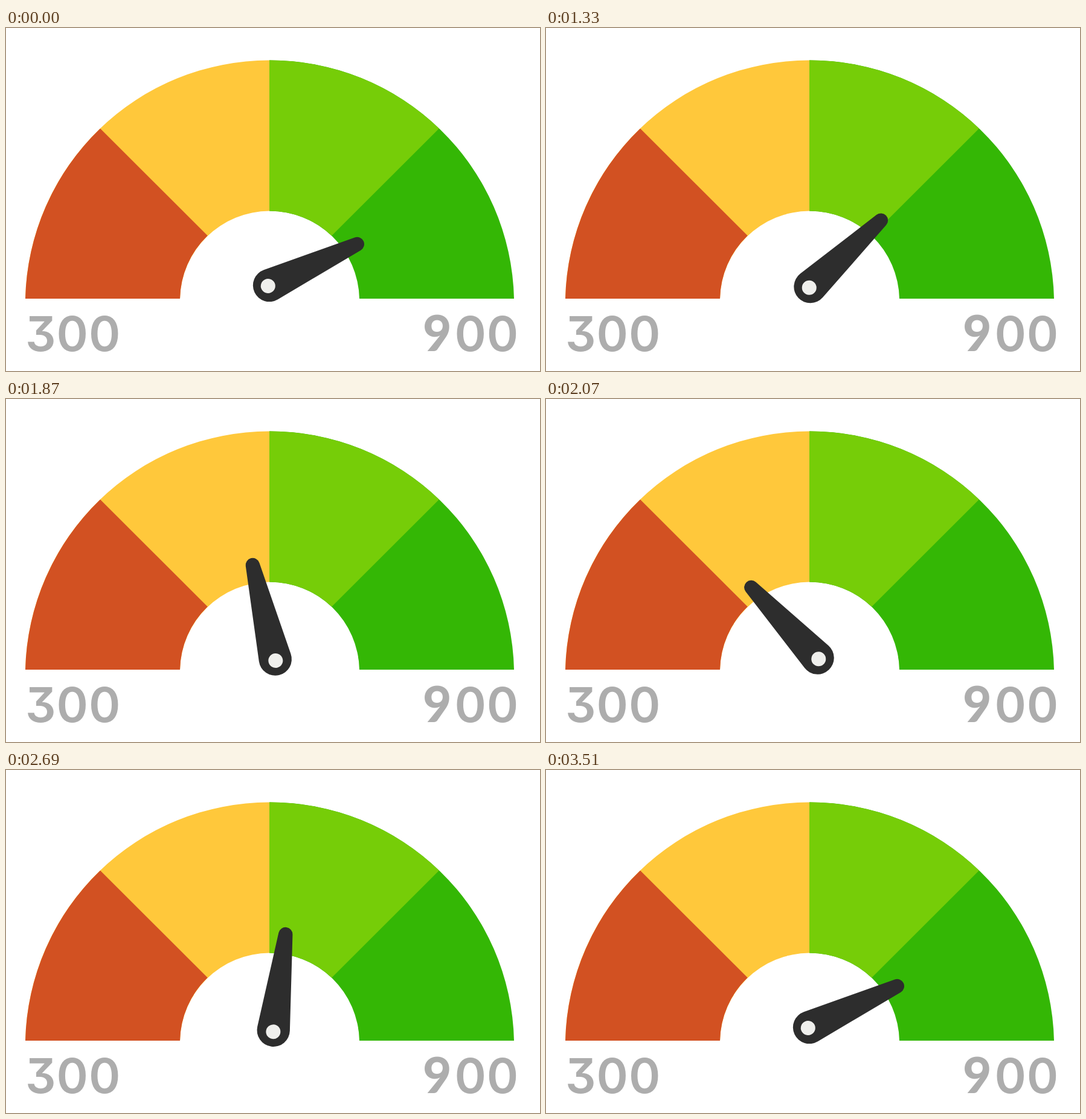
An HTML page that plays this animation: 884 by 569 pixels, repeating every 3.91 s.

```html
<!DOCTYPE html>
<html lang="en">
<head>
<meta charset="utf-8">
<title>Score gauge</title>
<style>
  html, body { margin: 0; width: 100%; height: 100%; overflow: hidden; background: #fff; }
  svg { display: block; width: 100vw; height: 100vh; }
  text {
    font: 600 79.5px Inter, Roboto, sans-serif;
    font-feature-settings: "cv09" 1;
    letter-spacing: 0.9px;
    fill: #adadad;
  }
  .nine { font: 800 82px Lato, sans-serif; }
</style>
</head>
<body>
<svg viewBox="0 0 884 569">
  <path fill="#ffc83b" d="M32 449A404.6 404.6 0 0 1 436 53.5V303.5A148.7 148.7 0 0 0 288 449Z"/>
  <path fill="#34b705" d="M436 53.5A404.6 404.6 0 0 1 841 449H585A148.7 148.7 0 0 0 436 303.5Z"/>
  <path fill="#d25122" d="M32 449A404.6 404.6 0 0 1 156 166.8L333.7 344.5A148.7 148.7 0 0 0 288 449Z"/>
  <path fill="#76cd08" d="M436 53.5A404.6 404.6 0 0 1 716.9 166.8L539.2 344.5A148.7 148.7 0 0 0 436 303.5Z"/>
  <text x="32" y="536">300</text>
  <text y="536"><tspan class="nine" x="690">9</tspan><tspan x="742.5">00</tspan></text>
  <g id="needle">
    <path id="blade" fill="#2d2d2d"/>
    <circle cy="11" r="12" fill="#efefec"/>
  </g>
</svg>
<script>
const LOOP = 3910, REST = 1000, TOP = 64.8, SWING = 130;
const holds = [
  60, 70, 70, 60, 70, 70, 60, 70, 70, 70, 60, 70, 70, 70, 70, 60, 70, 60, 70,
  70, 70, 80, 70, 60, 70, 70, 70, 70, 70, 60, 70, 70, 70, 60, 70, 70, 70
];
const needle = document.getElementById("needle");

// Tapered blade: hub and tip circles joined by their common tangents.
function bladePath(hubY, hubR, tipY, tipR) {
  const sin = (hubR - tipR) / (hubY - tipY), cos = Math.sqrt(1 - sin * sin);
  const at = (side, y, r) => `${side * r * cos} ${y - r * sin}`;
  return `M${at(-1, hubY, hubR)}L${at(-1, tipY, tipR)}` +
    `A${tipR} ${tipR} 0 0 1 ${at(1, tipY, tipR)}` +
    `L${at(1, hubY, hubR)}A${hubR} ${hubR} 0 1 1 ${at(-1, hubY, hubR)}Z`;
}

// Ease-in curve, cubic-bezier(.42, 0, 1, 1).
function easeIn(x) {
  if (x <= 0) return 0;
  if (x >= 1) return 1;
  let lo = 0, hi = 1;
  for (let i = 0; i < 30; i++) {
    const u = (lo + hi) / 2, v = 1 - u;
    if (1.26 * u * v * v + 3 * u * u * v + u * u * u < x) lo = u;
    else hi = u;
  }
  return lo * lo * (3 - 2 * lo);
}

function stepAt(t) {
  let n = -1, next = REST;
  while (t >= next) {
    n++;
    next += n < holds.length ? holds[n] : LOOP;
  }
  return n;
}

function angleAt(t) {
  const n = stepAt(t);
  const x = n <= 18 ? (n + 0.9) / 18.9 : (36.5 - n) / 18.8;
  return TOP - SWING * easeIn(x);
}

function draw(t) {
  needle.setAttribute("transform", `translate(443.75 423.3) rotate(${angleAt(t)})`);
}

document.getElementById("blade").setAttribute("d", bladePath(8.5, 27.2, -152, 11.7));
const start = performance.now();
function tick() {
  draw((performance.now() - start) % LOOP);
  requestAnimationFrame(tick);
}
draw(0);
requestAnimationFrame(tick);
</script>
</body>
</html>
```
